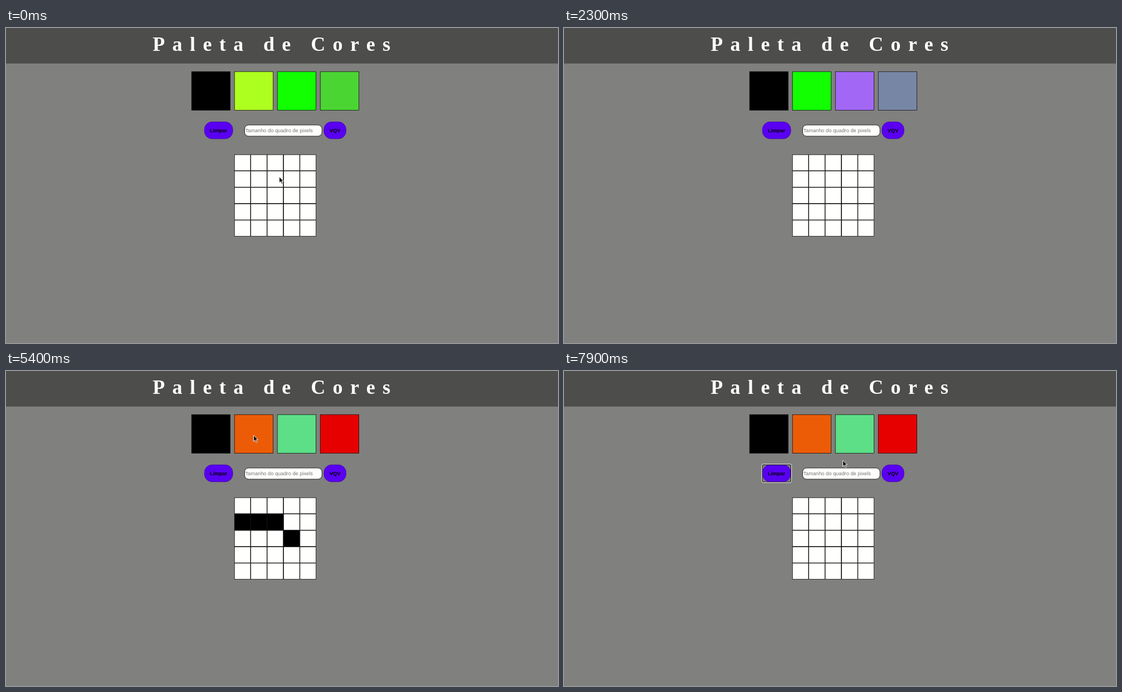
Animation, 991 px wide and 565 px high, one loop 8 s. Source, as an HTML page:

```html
<!DOCTYPE html>
<html lang="pt">
<head>
<meta charset="utf-8">
<title>Paleta de Cores</title>
<style>
  html, body { margin: 0; width: 100%; height: 100%; overflow: hidden; background: #80807e; }
  svg { display: block; width: 991px; height: 565px; }
  .title { font: bold 36px "Liberation Serif", serif; letter-spacing: 13.4px; fill: #fffffd; }
  .label { font: bold 9.33px "Liberation Sans", sans-serif; text-anchor: middle; }
  .hint { font: 9.28px "Liberation Sans", sans-serif; fill: #757575; }
  .button { fill: #5a00f2; stroke: #3c00a6; stroke-width: .7; }
</style>
</head>
<body>
<svg viewBox="0 0 991 565">
  <rect width="991" height="565" fill="#80807e"/>
  <rect width="991" height="63.7" fill="#4d4d4b"/>
  <text class="title" x="263.2" y="41">Paleta de Cores</text>

  <g id="swatches"></g>

  <rect class="button" x="356.3" y="168.3" width="50.8" height="30.4" rx="13.6"/>
  <text class="label" x="381.6" y="187">Limpar</text>
  <g id="focus" fill="none">
    <rect x="356" y="168" width="51.4" height="31.2" rx="1.5" stroke="#101010" stroke-width="1.4"/>
    <rect x="355" y="167" width="53.4" height="33" rx="2.5" stroke="#fff"/>
  </g>

  <rect x="428.4" y="174" width="138.8" height="20" rx="7" fill="#fffffd" stroke="#000" stroke-width=".8"/>
  <text class="hint" x="429.4" y="187">Tamanho do quadro de pixels</text>

  <rect class="button" x="570.8" y="168.3" width="39.6" height="30.4" rx="13.6"/>
  <text class="label" x="590.6" y="187">VQV</text>

  <g id="board"></g>

  <path id="cursor" d="M.5 1.2V12.3L3 9.9L5 14.3L6.9 13.5L5 9.2H8.5Z"
    fill="#111" stroke="#fff" stroke-width=".9" stroke-linejoin="round"/>
</svg>
<script>
const LOOP = 8000, STEP = 100;
const CENTER = 483.35, SWATCH = 70, PITCH = 77, CELL = 29.4, SIDE = 5;
const WHITE = '#fffffd', BLACK = '#000', ORANGE = '#ec5c06';
const $ = id => document.getElementById(id);

// Sample valueAt(ms) at ten frames a second and hold each sample.
function play(el, prop, valueAt) {
  const frames = [];
  for (let t = 0; t <= LOOP; t += STEP) {
    frames.push({ [prop]: valueAt(Math.min(t, LOOP - STEP)), easing: 'step-end' });
  }
  el.animate(frames, { duration: LOOP, iterations: Infinity }).startTime = 0;
}

function square(parent, x, y, size, line) {
  const el = document.createElementNS('http://www.w3.org/2000/svg', 'rect');
  const attrs = {
    x: x + line / 2, y: y + line / 2, width: size - line, height: size - line,
    fill: BLACK, stroke: BLACK, 'stroke-width': line
  };
  for (const name in attrs) el.setAttribute(name, attrs[name]);
  return parent.appendChild(el);
}

// Pointer: key points [time, x, y], eased in between
const stops = [
  [0, 490, 265.5], [100, 490, 265.5], [300, 502, 245], [400, 485, 227], [500, 485, 227], [600, 100, 82],
  [3200, 36, 36], [3400, 369, 242], [3800, 432, 271.5], [4400, 494, 277], [4700, 511, 297],
  [5100, 444, 216], [5400, 444, 114], [5600, 444, 114], [5700, 532, 253], [5900, 540, 245],
  [6300, 513, 270], [6700, 462, 299], [7200, 396, 208], [7500, 378, 184], [7900, 500, 159]
];

function pointer(t) {
  const i = stops.findIndex(stop => stop[0] >= t);
  const [t1, ...to] = stops[i];
  const [t0, ...from] = stops[Math.max(i - 1, 0)];
  const p = t1 > t0 ? (t - t0) / (t1 - t0) : 1;
  const ease = p * p * (3 - 2 * p);
  return from.map((v, k) => v + (to[k] - v) * ease);
}

play($('cursor'), 'transform', t => `translate(${pointer(t).map(v => v + 'px')})`);
play($('cursor'), 'opacity', t => t >= 800 && t < 3200 ? 0 : 1);

// Palette: black stays, the other three change on every reload
const FIRST_RELOAD = 1600, RELOAD = 700;
const palettes = [
  [BLACK, '#adff1f', '#11ff00', '#4bd533'],
  [BLACK, '#da76de', '#b76c22', '#11ff11'],
  [BLACK, '#11ff00', '#a268f5', '#7886a6'],
  [BLACK, ORANGE, '#5cdf87', '#e60000']
];
const reloadsBy = t => Math.max(0, Math.min(3, Math.floor((t - FIRST_RELOAD) / RELOAD) + 1));

for (let i = 0; i < 4; i++) {
  const el = square($('swatches'), CENTER + (i - 2) * PITCH + (PITCH - SWATCH) / 2, 77.85, SWATCH, .7);
  play(el, 'fill', t => palettes[reloadsBy(t)][i]);
}

// Board: each click paints the cell under the pointer
const PICK = 5400, CLEAR = 7500;
const clicks = [3900, 4100, 4400, 4700, 5900, 6300, 6600, 6800];
const left = CENTER - SIDE * CELL / 2, top_ = 226.85;

const cellAt = ([x, y]) => Math.floor((y - top_) / CELL) * SIDE + Math.floor((x - left) / CELL);

for (let n = 0; n < SIDE * SIDE; n++) {
  const el = square($('board'), left + n % SIDE * CELL, top_ + Math.floor(n / SIDE) * CELL, CELL, .75);
  const click = clicks.find(t => cellAt(pointer(t)) === n);
  const paint = click > PICK ? ORANGE : BLACK;
  play(el, 'fill', t => t >= click && t < CLEAR ? paint : WHITE);
}

play($('focus'), 'opacity', t => t >= CLEAR ? 1 : 0);
</script>
</body>
</html>
```
